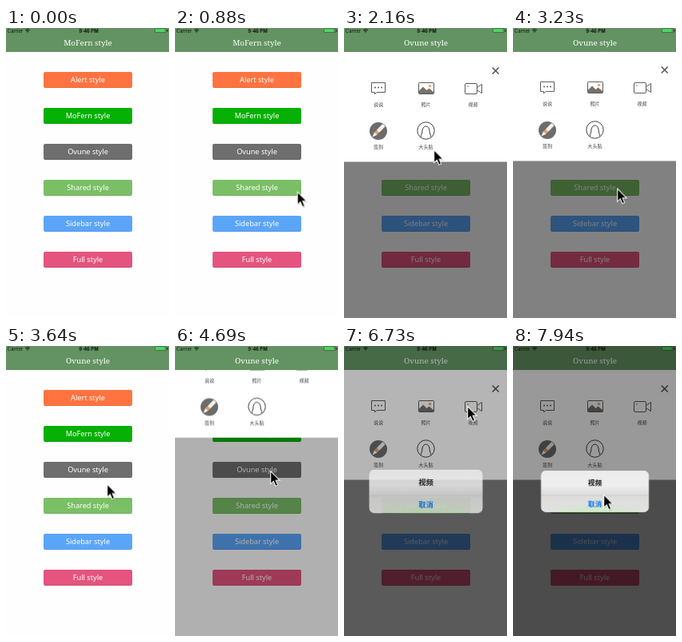
These frames come from a looping animation (204x363 px, 8 s). An HTML page:

```html
<!DOCTYPE html>
<html lang="en">
<head>
<meta charset="utf-8">
<title>Popup styles</title>
<style>
  html, body { margin: 0; width: 100%; height: 100%; overflow: hidden; background: #fefefe; }
  svg { display: block; width: 204px; height: 363px; }
  text { text-anchor: middle; }
  .button { font: 9.2px "Noto Sans", sans-serif; fill: #fff; }
  .title { font: 9.8px "Noto Serif", serif; fill: #fff; }
  .status { font: 5.9px Inter, sans-serif; fill: #111; }
  .label { font: 6.1px "Noto Sans CJK SC", "Noto Sans CJK", sans-serif; fill: #444; }
  .alert { font: bold 8.8px "Noto Sans CJK SC", "Noto Sans CJK", sans-serif; }
  .line { fill: none; stroke: #5a5a5a; stroke-width: 1; stroke-linejoin: round; }
  #alert { transform-origin: 102.5px 182px; }
</style>
</head>
<body>
<svg viewBox="0 0 204 363">
  <defs>
    <linearGradient id="glass" x2="0" y2="1">
      <stop offset="0" stop-color="#ececec"/>
      <stop offset=".35" stop-color="#efefef"/>
      <stop offset=".6" stop-color="#dcdcdc"/>
      <stop offset="1" stop-color="#e2e4e1"/>
    </linearGradient>
    <radialGradient id="glow" cy="1" r=".6">
      <stop offset="0" stop-color="#cdebc3"/>
      <stop offset="1" stop-color="#cdebc3" stop-opacity="0"/>
    </radialGradient>
  </defs>
  <rect width="204" height="363" fill="#fefefe"/>
  <g id="buttons"></g>
  <rect id="mask" y="30" width="204" height="333" opacity="0"/>

  <g id="panel">
    <rect y="30" width="204" height="137.5" fill="#fff"/>
    <path d="M185.7 49.5l8 8m0-8l-8 8" fill="none" stroke="#555" stroke-width="1.6"/>
    <g class="line">
      <path d="M34.5 68.5h17v12h-10.5l-2.5 2.5v-2.5h-4z"/>
      <rect x="93.5" y="68.5" width="19" height="14" rx=".8"/>
      <rect x="151.5" y="69.5" width="15" height="13" rx="1.5"/>
      <path d="M166.5 74.5l6-4v11l-6-4"/>
    </g>
    <g class="line" style="stroke: #3c3c3c">
      <circle cx="102.5" cy="128.5" r="10.7"/>
      <path d="M97 136.3q-1.600-1.800.6-4.300q.2-9 4.900-9t4.900 9q2.200 2.500.6 4.300"/>
    </g>
    <g fill="#5a5a5a">
      <circle cx="39" cy="74.5" r="1"/>
      <circle cx="43" cy="74.5" r="1"/>
      <circle cx="47" cy="74.5" r="1"/>
      <path d="M94 82v-3.500l5-5 4.500 4.500 3-2.500 5.500 4.500v2z" fill="#77706b"/>
    </g>
    <circle cx="107.5" cy="72.5" r="1.6" fill="#ee9a58"/>
    <circle cx="155" cy="73" r="1" fill="#ee9a58"/>
    <circle cx="43" cy="129" r="11" fill="#6c6c6c"/>
    <g transform="translate(35.5 136.5) rotate(-46)">
      <path d="M0 0L6-2.300V2.300z" fill="#fff"/>
      <rect x="6" y="-2.3" width="4" height="4.6" fill="#e9a25e"/>
      <rect x="10" y="-2.3" width="11" height="4.6" rx="1" fill="#f6f1ea"/>
    </g>
    <g class="label">
      <text x="43" y="98.3">说说</text>
      <text x="102.5" y="98.3">照片</text>
      <text x="161.5" y="98.3">视频</text>
      <text x="43" y="150.6">签到</text>
      <text x="102.5" y="150.6">大头贴</text>
    </g>
  </g>

  <rect width="204" height="30" fill="#639362"/>
  <g class="status">
    <text x="11.5" y="5.5">Carrier</text>
    <text x="103.5" y="5.5" font-weight="700">9:46 PM</text>
    <path d="M24 2.600q3-2.400 6 0M25.200 3.900q1.800-1.500 3.600 0" fill="none" stroke="#111" stroke-width=".9"/>
    <circle cx="27" cy="5" r=".7"/>
    <rect x="186.5" y=".8" width="14.5" height="4.8" rx="1" fill="none" stroke="#111" stroke-width=".3"/>
    <rect x="187" y="1.3" width="11.5" height="3.8" rx=".5" fill="#4cd964"/>
    <rect x="201.5" y="2.2" width="1.2" height="2.2" rx=".5"/>
  </g>
  <text id="first" class="title" x="102.5" y="22.2">MoFern style</text>
  <text id="second" class="title" x="102.5" y="22.2" opacity="0">Ovune style</text>

  <rect id="dim" width="204" height="363" opacity="0"/>
  <g id="alert" class="alert" opacity="0">
    <rect x="35" y="156" width="135" height="52" rx="6" fill="url(#glass)"/>
    <rect x="47" y="188" width="111" height="20" fill="url(#glow)"/>
    <path d="M35 187h135" stroke="#c4c4c4" stroke-width=".5"/>
    <text x="102.5" y="174.2" fill="#111">视频</text>
    <text x="102.5" y="200.8" fill="#0a74e8">取消</text>
  </g>

  <g id="cursor">
    <g transform="translate(.2 .7) scale(1.04)">
      <path d="M1 1.500V17l3.700-3.200 2.500 6 2.900-1.200-2.500-5.700h5z" opacity=".22"/>
      <path d="M.5.500V15.800L4 12.500l2.500 6 2.700-1.100-2.500-5.800h4.800z" stroke="#fff"/>
    </g>
  </g>
</svg>
<script>
const LOOP = 8000;
const $ = id => document.getElementById(id);

$('buttons').innerHTML = [
  ['Alert', '#ff7340'], ['MoFern', '#06b004'], ['Ovune', '#6e6e6e'],
  ['Shared', '#7abf66'], ['Sidebar', '#5ba5f9'], ['Full', '#e4547f']
].map(([name, color], i) => {
  const y = 55 + i * 45;
  return `<rect x="47" y="${y}" width="111" height="20" rx="2" fill="${color}"/>
    <path d="M48.5 ${y + 19.6}h108" stroke="#000" stroke-opacity=".12" stroke-width=".8"/>
    <text class="button" x="102.5" y="${y + 12.8}">${name} style</text>`;
}).join('');

// steps: [ms, value, easing towards the next step]
function track(id, prop, steps, format = v => v) {
  const all = [[0, steps[0][1]], ...steps, [LOOP, steps[steps.length - 1][1]]];
  $(id).animate(all.map(([ms, value, easing = 'linear']) =>
    ({ offset: ms / LOOP, [prop]: format(value), easing })),
    { duration: LOOP, iterations: Infinity });
}

const shift = y => `translate(0px, ${y}px)`;
const move = ([x, y]) => `translate(${x}px, ${y}px)`;
const inOut = 'ease-in-out', out = 'ease-out';

track('first', 'opacity', [[1815, 1], [1815, 0]]);
track('second', 'opacity', [[1815, 0], [1815, 1]]);

const HIDDEN = -138;
track('panel', 'transform', [
  [1830, HIDDEN, inOut], [2150, 0], [3210, 0, inOut], [3540, HIDDEN],
  [4540, HIDDEN, inOut], [4805, 0]
], shift);
track('mask', 'opacity', [
  [1830, 0, inOut], [2150, .5], [3210, .5, inOut], [3540, 0],
  [4540, 0, inOut], [4805, .5]
]);

track('dim', 'opacity', [[6540, 0], [6730, .29, out], [7050, .4]]);
track('alert', 'opacity', [[6540, 0], [6730, .84, out], [6950, 1]]);
track('alert', 'transform', [[6540, 1.2, out], [6730, 1.052, out], [7050, 1]], v => `scale(${v})`);

track('cursor', 'transform', [
  [115, [214, 270]], [120, [199, 268.5]], [180, [193, 268]],
  [400, [193, 268]], [800, [160, 214]], [1170, [126, 168]], [1340, [112, 151.5]],
  [2540, [112, 151.5], inOut], [2760, [130, 200]],
  [3460, [130, 200]], [3640, [126, 172], out], [4040, [119, 155.5]],
  [5060, [119, 155.5]], [5390, [173, 112]], [5640, [191, 56], out],
  [5860, [189, 57], inOut], [6150, [154, 74.5]],
  [6930, [154, 74.5], inOut], [7420, [129, 149]],
  [7610, [129, 149], inOut], [7935, [113, 185]]
], move);
</script>
</body>
</html>
```
